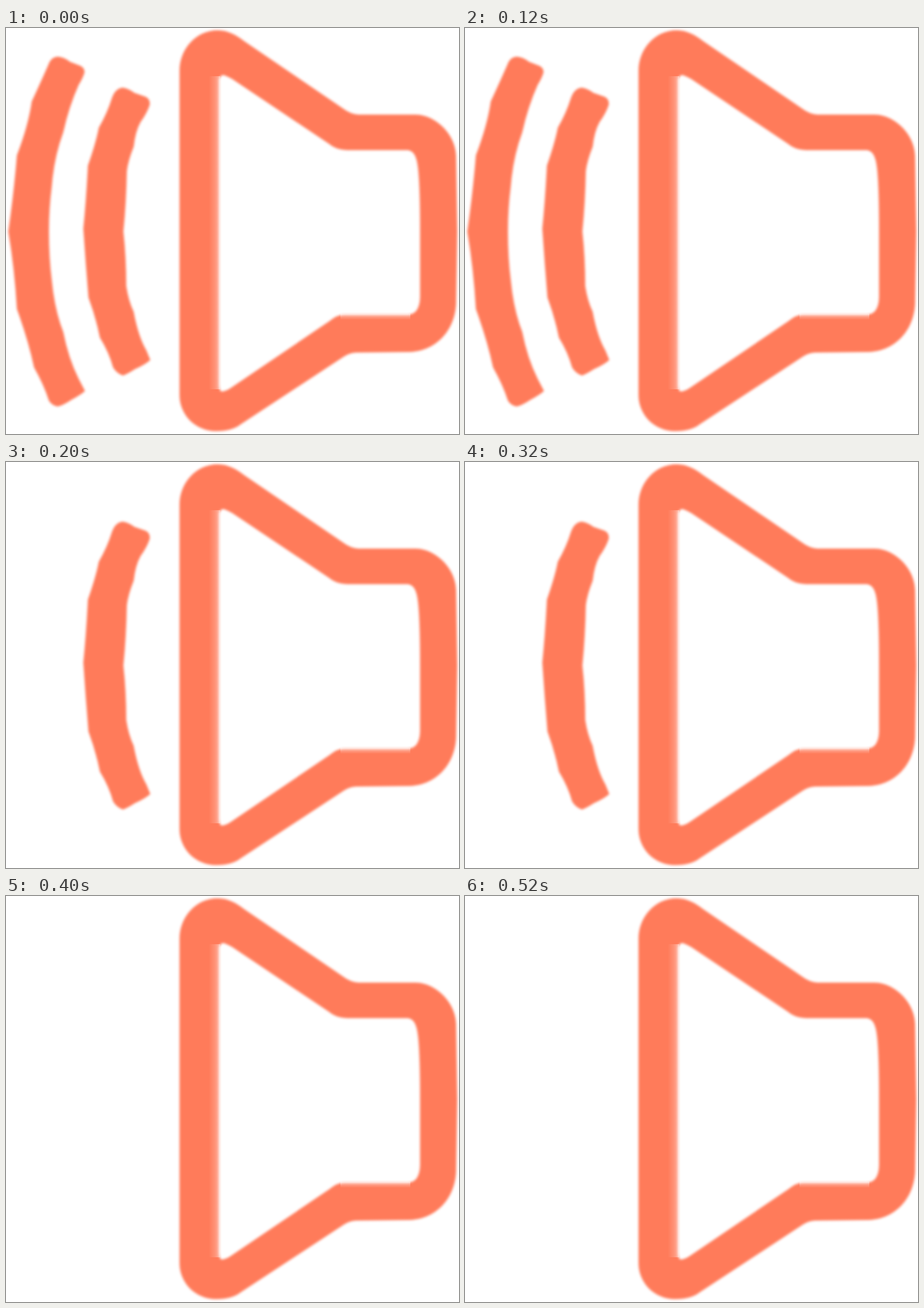
An HTML page that plays this animation: 791 px wide and 708 px high, repeating every 600 ms.

```html
<!DOCTYPE html>
<html lang="en">
<head>
<meta charset="utf-8">
<title>Speaker</title>
<style>
  html, body { margin: 0; width: 100%; height: 100%; overflow: hidden; background: #fff; }
  svg { display: block; width: 791px; height: 708px; }
</style>
</head>
<body>
<svg viewBox="0 0 791 708">
  <defs>
    <filter id="soft" filterUnits="userSpaceOnUse" x="-10" y="-10" width="811" height="728" color-interpolation-filters="sRGB">
      <feGaussianBlur stdDeviation="2"/>
    </filter>
    <linearGradient id="fade">
      <stop offset="0" stop-color="#fff" stop-opacity="0"/>
      <stop offset=".5" stop-color="#fff" stop-opacity=".16"/>
      <stop offset="1" stop-color="#fff" stop-opacity=".45"/>
    </linearGradient>
    <linearGradient id="fadeDown" x2="0" y2="1">
      <stop offset="0" stop-color="#fff" stop-opacity=".5"/>
      <stop offset="1" stop-color="#fff" stop-opacity="0"/>
    </linearGradient>
  </defs>
  <g fill="#ff7b5a" filter="url(#soft)">
    <path id="farWave" d="M74 64 Q79 50 91 50 Q102 51 112 59 L130 66 Q138 70 137 78 Q134 88 127 99
      Q110 137 100 182 Q84 225 80 276 Q75 315 75 355 Q75 400 80 440 Q85 492 100 530
      Q109 576 127 612 L138 633 Q130 640 115 648 Q98 659 90 660 Q80 658 75 650
      Q66 622 49 592 Q39 545 19 490 Q15 420 4 355 Q14 285 19 222 Q39 170 45 128 Q59 98 74 64 Z"/>
    <path id="nearWave" d="M185 122 Q191 105 204 104 Q215 106 224 113 L244 120 Q252 124 251 134
      Q246 149 235 164 Q226 180 223 207 Q213 232 211 250 Q210 305 205 355 Q210 400 210 450
      Q214 476 223 495 Q231 538 245 562 L252 579 Q243 587 225 595 Q211 604 204 606 Q193 602 187 592
      Q180 566 164 540 Q157 505 144 470 Q139 410 135 350 Q140 300 143 240 Q157 200 162 174 Q177 148 185 122 Z"/>
    <path fill-rule="evenodd" d="M303 75 C303 36 332 4 370 4 C388 4 403 13 416 23
      L588 140 Q601 150 615 151 L715 151 C750 151 786 186 786 225 L788 355 L786 480
      C784 530 748 564 705 565 L612 566 Q601 566 590 573 L410 691 Q395 703 367 703
      C331 703 303 675 303 640 Z
      M372 90 Q374 82 380 82 Q386 84 395 89 L564 202 Q575 212 595 213 L700 213
      Q714 213 718 235 Q723 260 723 355 L723 470 Q722 498 703 500 L590 500
      Q578 500 565 511 L395 626 Q384 634 376 634 Q372 632 372 620 Z"/>
  </g>
  <rect x="354" y="84" width="20" height="546" fill="url(#fade)"/>
  <rect x="584" y="498" width="122" height="11" fill="url(#fadeDown)"/>
</svg>
<script>
  const STEP = 200, LOOP = 600;
  const waves = ["farWave", "nearWave"].map(id => document.getElementById(id));
  const start = performance.now();

  // The waves drop out one by one, from the outside in.
  function draw(now) {
    const step = Math.floor((Math.max(0, now - start) % LOOP) / STEP);
    waves.forEach((wave, i) => {
      wave.style.visibility = step > i ? "hidden" : "visible";
    });
    requestAnimationFrame(draw);
  }
  draw(start);
</script>
</body>
</html>
```
